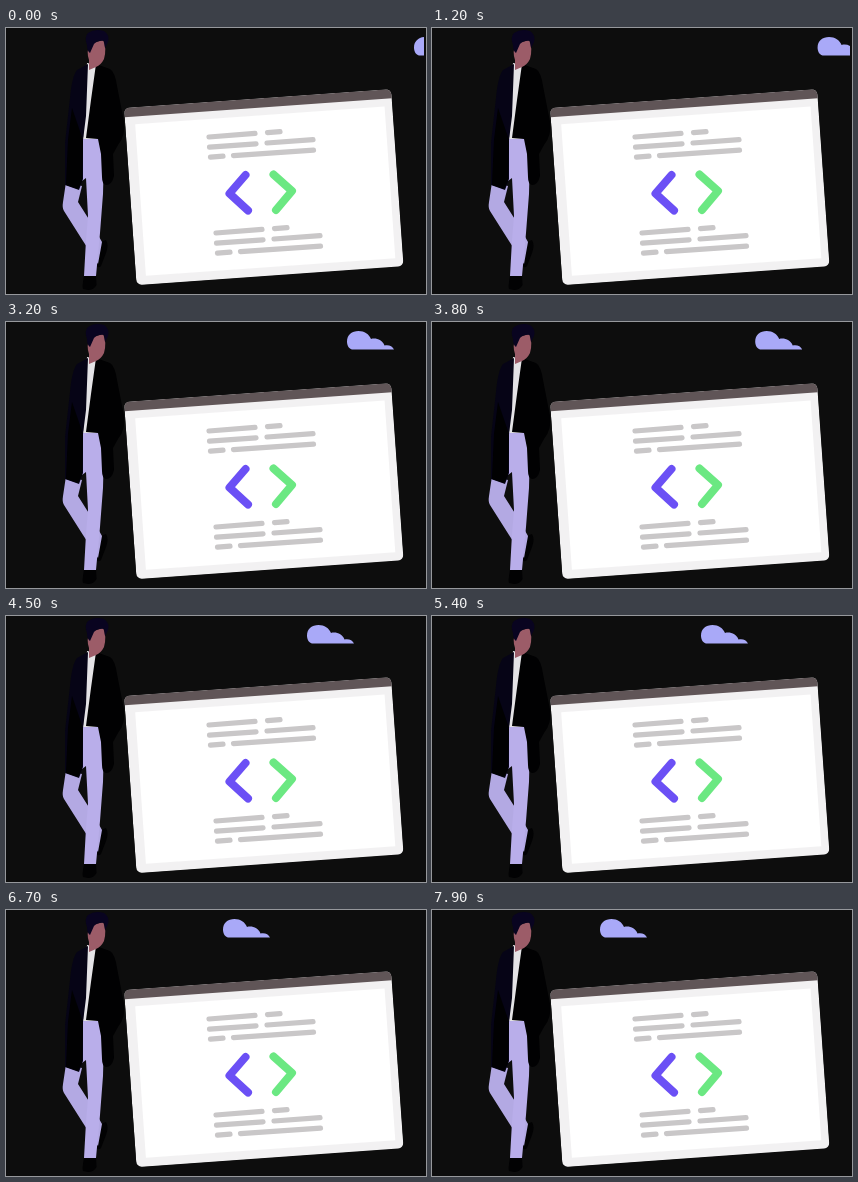
Animation, 420 px wide and 266 px high, one loop 8000 ms. Source, as an HTML page:

```html
<!DOCTYPE html>
<html lang="en">
<head>
<meta charset="utf-8">
<title>Leaning on the browser</title>
<style>
  html, body { margin: 0; width: 100%; height: 100%; overflow: hidden; background: #0d0d0d; }
  svg { display: block; width: 420px; height: 266px; }
  .lines { fill: none; stroke: #c9c7c8; stroke-width: 5.2; stroke-linecap: round; }
  .bracket { fill: none; stroke-width: 8; stroke-linecap: round; stroke-linejoin: round; }
</style>
</head>
<body>
<svg viewBox="0 0 420 266">
  <defs>
    <clipPath id="sky"><rect width="418" height="266"/></clipPath>
    <clipPath id="card"><rect width="267.7" height="177.5" rx="5.5"/></clipPath>
    <path id="code" d="M203 109L249 105.4M261.5 104.6L274 103.6M203.5 119.2L250 115.8M261 115L307 111.6M204.500 129.2L217 128.2M227.500 127.600L307.500 122.2"/>
  </defs>

  <g clip-path="url(#sky)">
    <path id="cloud" fill="#a9a9f8" d="M5 18.500C1.500 17.500 0 14 0 10.500C0 4 5 0 11.500 0C17.500 0 22 3 24 8C29 6.500 35.500 9 37.500 14.500C41.500 13.500 45.500 15 47 18.500Z"/>
  </g>

  <g id="person">
    <!-- shoes -->
    <path fill="#020203" d="M78 247L90 247L90.500 257Q88 262 82 262L77 261Q76 259 78 247Z"/>
    <path fill="#020203" d="M95 214L100 212Q103 217 100 225L95 238Q92 241 90 237Z"/>
    <!-- legs -->
    <path fill="#b3a9e3" d="M60 154L76 158L72 174L84 193L96 214L92 236L77 213L58 183Q56 180 57 174Z"/>
    <path fill="#b9aeea" d="M76 109L95 110L98 124L97 166L94 205L90 248L78 248L80 212L82 188L80 150L76 153Z"/>
    <!-- shirt and jacket -->
    <path fill="#e4e3e6" d="M81 35L92 37L91 111L77 111Z"/>
    <path fill="#060416" d="M82 36L71 42Q66 48 64 70L59 115L59 157L73 162L77 151L77 112L80 88Z"/>
    <path fill="#010102" d="M90 36L104 41Q109 44 111 58L118 94Q120 107 112 117L107 126L108 148Q106 157 100 157Q96 156 96 149L95 126L92 111L80 110L85 72Z"/>
    <path fill="#010102" d="M66 80L77 112L76 153L72 161L60 157L62 112Z"/>
    <!-- head -->
    <path fill="#9c5c68" d="M84 16L97 12Q101 20 98 31Q95 37 90 39L83 42L83 32Q80 23 84 16Z"/>
    <path fill="#090420" d="M81 17Q78 9 82 5Q89 0 98 3Q104 7 102 14L99 20L98 13Q92 12 88 16L84 25Q81 23 81 17Z"/>
  </g>

  <g transform="translate(118 80) rotate(-4.05)" clip-path="url(#card)">
    <rect width="268" height="178" fill="#f2f1f2"/>
    <rect width="268" height="9.300" fill="#605557"/>
    <rect x="10" y="17" width="250" height="152" fill="#fff"/>
  </g>
  <g class="lines">
    <use href="#code"/>
    <use href="#code" x="7" y="96"/>
  </g>
  <path class="bracket" stroke="#6b50f5" d="M239.500 147L223.500 165.500L242 182.500"/>
  <path class="bracket" stroke="#6be882" d="M267.500 146.500L286 163L270 182"/>
</svg>
<script>
  const LOOP = 8000, STEP = 100;
  // time in ms, left edge of the cloud
  const path = [[0, 408], [2300, 364], [3200, 341], [4500, 301], [5400, 269], [6700, 217], [7900, 168]];
  const last = path.length - 1;
  const cloud = document.getElementById("cloud");

  function slope(i) {
    const [t0, x0] = path[Math.max(i - 1, 0)];
    const [t1, x1] = path[Math.min(i + 1, last)];
    return (x1 - x0) / (t1 - t0);
  }

  // smooth curve through the points of the path
  function cloudX(t) {
    let i = 0;
    while (i < last - 1 && t > path[i + 1][0]) i++;
    const [t0, x0] = path[i], [t1, x1] = path[i + 1];
    const d = t1 - t0, u = (t - t0) / d, v = 1 - u;
    return x0 * v * v * (1 + 2 * u) + x1 * u * u * (1 + 2 * v)
      + d * u * v * (slope(i) * v - slope(i + 1) * u);
  }

  function draw(now) {
    const t = Math.floor((now % LOOP) / STEP) * STEP;
    cloud.setAttribute("transform", `translate(${cloudX(t).toFixed(2)} 9)`);
    requestAnimationFrame(draw);
  }
  draw(performance.now());
</script>
</body>
</html>
```
